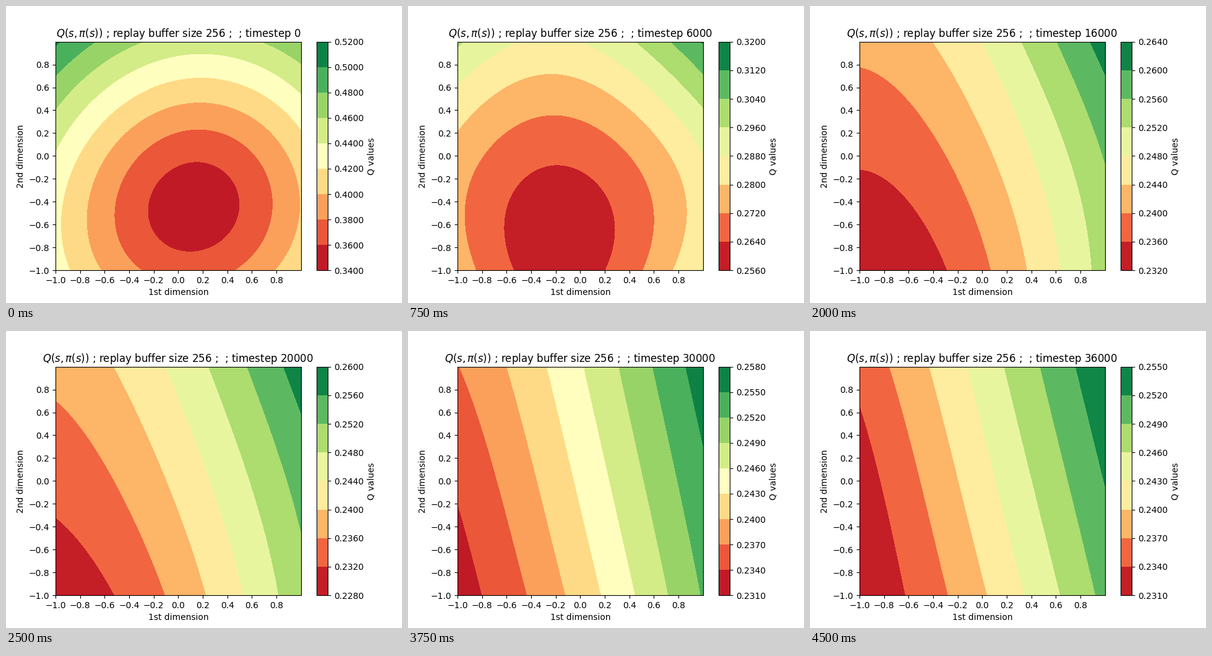
A matplotlib script for the animation above (4.75 s loop, 640x480 px).

```python
import numpy as np
import matplotlib.pyplot as plt
from matplotlib.animation import FuncAnimation
from matplotlib.ticker import MaxNLocator

FRAMES, INTERVAL = 19, 250
STEPS_PER_FRAME = 2000

# Q at x = -1, 0, 1 (across) for y = -1, 0, 1 (one group each)
KEYS = {
    0: [(.4300, .3710, .4160), (.4380, .3650, .4090), (.5030, .4520, .4760)],
    3: [(.2768, .2608, .2888), (.2768, .2660, .2876), (.2972, .2880, .3126)],
    6: [(.2440, .2448, .2630), (.2463, .2488, .2645), (.2528, .2568, .2735)],
    10: [(.2296, .2372, .2506), (.2332, .2410, .2535), (.2372, .2451, .2580)],
    13: [(.2343, .2414, .2529), (.2352, .2440, .2550), (.2382, .2466, .2576)],
    15: [(.2327, .2412, .2522), (.2344, .2435, .2543), (.2369, .2457, .2566)],
    18: [(.2313, .2396, .2498), (.2325, .2419, .2521), (.2349, .2442, .2545)],
}

axis = np.linspace(-1, 1, 81)
# Quadratic weights of the three key positions along one axis
weights = np.array([axis * (axis - 1) / 2, 1 - axis**2, axis * (axis + 1) / 2])
ticks = np.arange(-5, 5) / 5
locator = MaxNLocator(8, min_n_ticks=1)


def key_values(frame):
    """Key heights at a frame, settling quickly towards the next key."""
    before = max(k for k in KEYS if k <= frame)
    after = min(k for k in KEYS if k >= frame)
    t = (frame - before) / max(after - before, 1)
    ease = t * (2 - t)
    return (1 - ease) * np.array(KEYS[before]) + ease * np.array(KEYS[after])


def surface(values):
    """Cone-like sheet: the squared height over a floor is quadratic."""
    floor = values.min() - 0.6 * np.ptp(values)
    return floor + np.sqrt(weights.T @ (values - floor) ** 2 @ weights)


fig = plt.figure(figsize=(6.4, 4.8), dpi=100)


def draw(frame):
    q = surface(key_values(frame))
    levels = locator.tick_values(q.min(), q.max())

    fig.clf()
    ax = fig.add_subplot()
    filled = ax.contourf(axis, axis, q, levels=levels, cmap="RdYlGn",
                         vmin=levels[0], vmax=levels[-1])
    ax.set(xticks=ticks, yticks=ticks, xlim=(-1, 1), ylim=(-1, 1),
           xlabel="1st dimension", ylabel="2nd dimension")
    ax.set_title(r"$Q(s,\pi(s))$ ; replay buffer size 256 ;  ; timestep "
                 f"{frame * STEPS_PER_FRAME}", pad=5.28)
    fig.colorbar(filled, ax=ax, ticks=levels, format="%.4f", label="Q values")
    return []


anim = FuncAnimation(fig, draw, frames=FRAMES, interval=INTERVAL,
                     repeat=True, repeat_delay=0)
plt.show()
```
